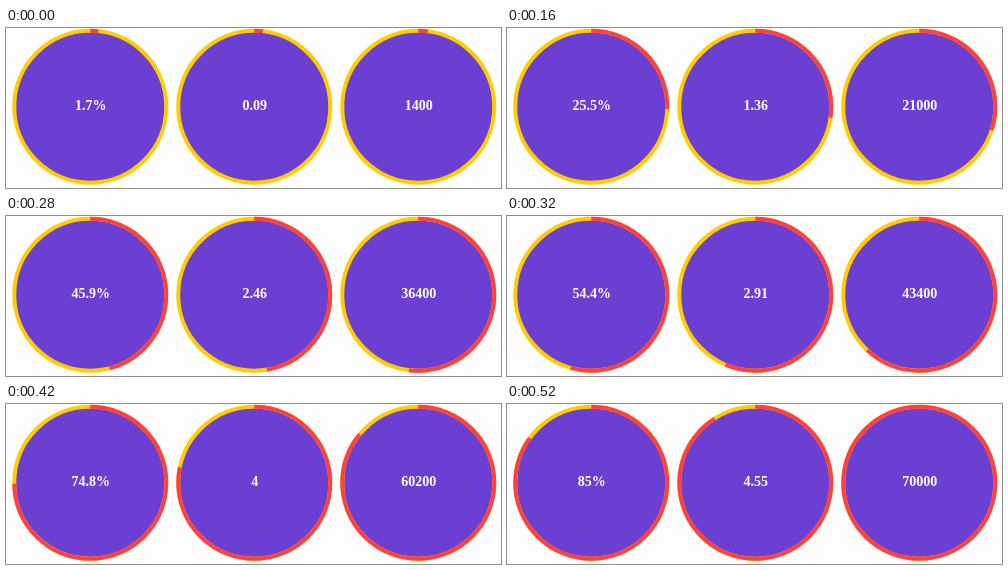
Animation of 495 by 160 pixels, one loop 0.54 s. Source, as an HTML page:

```html
<!DOCTYPE html>
<html lang="en">
<head>
<meta charset="utf-8">
<title>Progress rings</title>
<style>
  html, body { margin: 0; width: 100%; height: 100%; overflow: hidden; background: #fdfdfd; }
  svg { display: block; }
  .disc { fill: #6b3fd2; stroke: #ffcc00; stroke-width: 4; }
  .arc { fill: none; stroke: #ff4040; stroke-width: 4; }
  text { fill: #fff; font: bold 14px "Liberation Serif", Times, serif; text-anchor: middle; }
</style>
</head>
<body>
<svg width="495" height="160" viewBox="0 0 495 160"></svg>
<script>
const STEP = 20, STEPS = 27, TICKS = 50, CY = 78.75, R = 76;

// [step, ticks counted so far]
const PACE = [[0, 1], [4, 8], [8, 15], [11, 20], [16, 32], [21, 44], [26, 50]];

// Gauges update in turn, so later parts can trail by one tick.
const GAUGES = [
  { x: 84.25, end: 85, max: 100, digits: 1, unit: '%', arcLag: 0, labelLag: 0 },
  { x: 248.25, end: 4.55, max: 5, digits: 2, unit: '', arcLag: 1, labelLag: 0 },
  { x: 412.25, end: 70000, max: 70000, digits: 0, unit: '', arcLag: 1, labelLag: 1 }
];

const svg = document.querySelector('svg');

function add(tag, attrs) {
  const el = document.createElementNS('http://www.w3.org/2000/svg', tag);
  for (const key in attrs) el.setAttribute(key, attrs[key]);
  return svg.appendChild(el);
}

for (const g of GAUGES) {
  const ring = { cx: g.x, cy: CY, r: R };
  add('circle', { ...ring, class: 'disc' });
  g.arc = add('circle', {
    ...ring, class: 'arc', pathLength: 100, transform: `rotate(-90 ${g.x} ${CY})`
  });
  g.label = add('text', { x: g.x + 0.4, y: 82 });
}

function ticksAt(step) {
  const i = Math.max(1, PACE.findIndex(p => p[0] >= step));
  const [s0, n0] = PACE[i - 1], [s1, n1] = PACE[i];
  return Math.round(n0 + (n1 - n0) * (step - s0) / (s1 - s0));
}

function draw(step) {
  const ticks = ticksAt(step);
  const trailing = step > STEPS / 2 && step < STEPS - 1;
  for (const g of GAUGES) {
    const valueAt = lag => g.end * (ticks - (trailing ? lag : 0)) / TICKS;
    const label = (valueAt(g.labelLag) - 1e-9).toFixed(g.digits);
    g.arc.setAttribute('stroke-dasharray', `${100 * valueAt(g.arcLag) / g.max} 100`);
    g.label.textContent = Number(label) + g.unit;
  }
}

const start = performance.now();
let shown = -1;

function tick() {
  const step = Math.floor((performance.now() - start) / STEP) % STEPS;
  if (step !== shown) draw(shown = step);
  requestAnimationFrame(tick);
}
tick();
</script>
</body>
</html>
```
